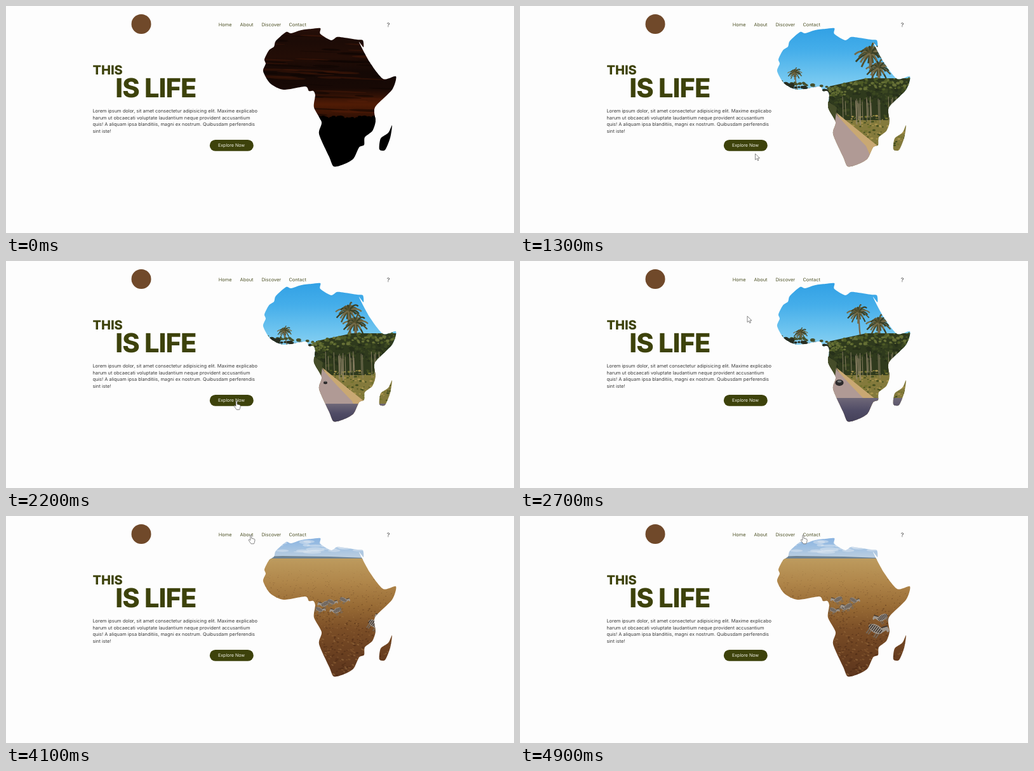
Write an HTML page with a canvas that moves like this. It is 800x358 px and loops after 5 s.

```html
<!DOCTYPE html>
<html lang="en">
<head>
<meta charset="utf-8">
<title>This is life</title>
<style>
html, body { margin: 0; height: 100%; overflow: hidden; background: #fdfdfd; }
canvas, svg { position: absolute; left: 0; top: 0; width: 800px; height: 358px; }
text { font: 7.4px Inter, "Open Sans", sans-serif; fill: #3a3a3a; text-rendering: geometricPrecision; }
.olive text { fill: #51552a; }
.olive .title { fill: #3d420b; font-size: 20px; font-weight: 800; letter-spacing: 0; }
.olive .big { font-size: 41.5px; letter-spacing: -.85px; }
</style>
</head>
<body>
<canvas id="stage" width="800" height="358"></canvas>
<svg viewBox="0 0 800 358">
  <circle cx="213" cy="28.5" r="15.5" fill="#70492a"/>
  <g class="olive">
    <text x="334.8" y="32.4">Home</text>
    <text x="368.6" y="32.4">About</text>
    <text x="402.4" y="32.4">Discover</text>
    <text x="445.4" y="32.4">Contact</text>
    <text class="title" x="136.4" y="107.6">THIS</text>
    <text class="title big" x="172.2" y="144.4">IS LIFE</text>
  </g>
  <text x="599.8" y="33" style="font-size:9px">?</text>
  <text x="136.4" y="168">Lorem ipsum dolor, sit amet consectetur adipisicing elit. Maxime explicabo</text>
  <text x="136.4" y="178.6">harum ut obcaecati voluptate laudantium neque provident accusantium</text>
  <text x="136.4" y="189.1">quis! A aliquam ipsa blanditiis, magni ex nostrum. Quibusdam perferendis</text>
  <text x="136.4" y="199.6">sint iste!</text>
  <rect x="320.8" y="211" width="69" height="17.8" rx="8.9" fill="#3d420b"/>
  <text x="334" y="222.4" style="font-size:7.05px;fill:#f4f4ea">Explore Now</text>
  <g id="cursor" fill="#fff" stroke="#555" stroke-width=".7" stroke-linejoin="round">
    <path id="arrow" d="M0 0V9.6L2.3 7.6 3.9 11 5.4 10.3 3.9 7H7Z"/>
    <path id="hand" d="M-1 1Q-1-.2 0-.2T1 1V5.2L5 6.2Q6.4 6.6 6.2 8L5.6 11.4 4.6 13.8H.2L-3.6 8.4Q-3.8 6.8-2.4 7.2L-1 8.4Z"/>
  </g>
</svg>
<script>
const LOOP = 5000, ROAD = 1000, PLAINS = 3000;
const $ = id => document.getElementById(id);
const ctx = $('stage').getContext('2d');
const mix = (a, b, p) => a + (b - a) * p;
const progress = (t, from, to) => Math.min(1, Math.max(0, (t - from) / (to - from)));

// Smooth closed outline through "x,y" points
function outline(text) {
  const pts = text.split(' ').map(s => s.split(',').map(Number));
  const at = i => pts[(i + pts.length) % pts.length];
  const path = new Path2D();
  path.moveTo(...pts[0]);
  pts.forEach((p, i) => {
    const [before, next, after] = [at(i - 1), at(i + 1), at(i + 2)];
    path.bezierCurveTo(
      ...p.map((v, k) => v + (next[k] - before[k]) / 8),
      ...next.map((v, k) => v - (after[k] - p[k]) / 8), ...next);
  });
  return path;
}
const land = outline('481,36 495,35 495,44 512,54 521,49 533,50 553,53 562,54 563,65 556,57 573,89 594,115 614,111 ' +
  '608,132 581,160 582,182 577,197 565,207 564,219 556,223 547,241 531,250 516,253 509,238 493,202 497,183 485,160 ' +
  '487,141 484,134 477,134 471,127 437,132 416,122 405,103 409,91 407,84 414,70 422,64 425,55 441,41 449,43 465,38');
land.addPath(outline('608,188 605,208 597,227 588,226 590,209 602,200'));

function scatter(n, seed, make) {
  const next = () => (seed = (seed * 16807) % 2147483647) / 2147483647;
  return Array.from({ length: n }, () => make((a, b) => mix(a, b, next())));
}

function fade(y0, y1, ...colors) {
  const g = ctx.createLinearGradient(0, y0, 0, y1);
  colors.forEach((c, i) => g.addColorStop(i / (colors.length - 1), c));
  ctx.fillStyle = g;
  ctx.fillRect(400, y0, 220, y1 - y0);
}
function oval(x, y, rx, ry, color, turn = 0) {
  ctx.fillStyle = color;
  ctx.beginPath();
  ctx.ellipse(x, y, rx, ry, turn, 0, 7);
  ctx.fill();
}
function shape(color, ...pts) {
  ctx.fillStyle = color;
  ctx.beginPath();
  pts.forEach(p => ctx.lineTo(...p));
  ctx.fill();
}
function line(color, width, ...pts) {
  ctx.strokeStyle = color;
  ctx.lineWidth = width;
  ctx.beginPath();
  pts.forEach(p => ctx.lineTo(...p));
  ctx.stroke();
}

const streaks = scatter(75, 11, r => ({ x: r(400, 620), y: r(38, 172), w: r(12, 45), h: r(.5, 2), glow: r(0, 1) < .5 }));
const treeline = scatter(50, 5, r => [r(485, 600), r(175, 180), r(2, 5)]);

function sunset(t) {
  fade(30, 180, '#2b1009', '#1c0b06', '#230d06', '#140805', '#180905', '#501b05', '#2b0f04');
  for (const s of streaks)
    oval(s.x + t * .002, s.y, s.w, s.h, s.glow ? '#5d220a50' : '#0c040380', .04);
  ctx.fillStyle = '#000';
  ctx.fillRect(400, 178, 220, 80);
  for (const [x, y, r] of treeline) oval(x, y, r, r * .7, '#000');
}

function palm(x, y, r, base) {
  line('#75674d', r * .09 + .5, [x, y], [x + r * .1, (y + base) / 2], [x + r * .3, base]);
  ctx.lineWidth = r * .11;
  for (let i = 0; i < 24; i++) {
    const a = i * 2.4, len = r * (.75 + .25 * Math.sin(i * 5));
    const dx = Math.cos(a) * len, dy = Math.sin(a) * len * .8;
    ctx.strokeStyle = ['#3a4026', '#746b48', '#55512f'][i % 3];
    ctx.beginPath();
    ctx.moveTo(x, y);
    ctx.quadraticCurveTo(x + dx * .6, y + dy * .8 - r * .2, x + dx, y + dy + r * .2);
    ctx.stroke();
  }
}

const canopy = x => 114 + Math.max(0, 545 - x) * .22;
const leaves = scatter(420, 23, r => {
  const x = r(484, 640), depth = r(0, 1);
  return [x, canopy(x) + depth * 44, r(1, 3.2), depth < .4 ? ['#4d5a26', '#667036'][r(0, 2) | 0] : ['#27301a', '#3b4721'][r(0, 2) | 0]];
});
const trunks = scatter(26, 31, r => [r(505, 600), r(142, 155), r(172, 190)]);
const grass = scatter(260, 41, r => [r(508, 618), r(172, 230), r(.8, 2.6), ['#465020', '#74742f', '#a8944e'][r(0, 3) | 0]]);
const bush = scatter(90, 53, r => [r(400, 490), r(0, 18), r(1.5, 4)]);

function road(t) {
  const p = progress(t, 1300, 2700), sway = Math.cos(p * 2 * Math.PI);
  fade(30, 150, '#2f9fe4', '#45aeea', '#6ec4ef', '#9bd9f3');
  palm(433 + 9 * p, 105 + 8 * p, 12, 132);
  for (const [x, y, r] of bush) oval(x, 114 + y + (x - 405) * .17, r, r * .7, y < 5 ? '#46502c' : '#272d20');
  palm(552 - 19 * p, 75 + 6 * p, 26 - 7 * p, 140);
  palm(556 + 9 * sway, 98, 21, 145);
  ctx.fillStyle = '#847a3c';
  ctx.fillRect(484, 165, 136, 90);
  shape('#2f3a1d', [484, 180], [488, canopy(488)], [545, canopy(545)], [620, 114], [620, 180]);
  for (const [x, y, r, c] of leaves) oval(x + 3 * sway, y, r, r * .75, c);
  for (const [x, y, r, c] of grass) oval(x + 3 * sway, y, r, r * .6, c);
  for (const [x, y0, y1] of trunks) line('#9a8c70', .8, [x + 3 * sway, y0], [x + 3 * sway + 1, y1]);
  shape('#c9a873', [498, 168], [540, 202], [570, 226], [575, 255], [545, 255]);
  shape('#b09a95', [495, 165], [501, 174], [520, 195], [545, 221], [560, 255], [470, 255], [492, 200]);
  shape('#454d29', [484, 150], [499, 160], [496, 183], [490, 190]);
  if (t < 1600) return;
  fade(mix(236, 216, progress(t, 1600, 2700)), 255, '#6f6878', '#504c66', '#433f58');
  if (t < 2200) return;
  const size = mix(3, 8, progress(t, 2200, 2900));
  oval(503, 192, size, size * .75, '#2c2a2b');
  oval(503, 190, size * .5, size * .25, '#77797a');
}

const clouds = scatter(28, 61, r => [r(405, 570), r(40, 59), r(5, 15), r(1, 3)]);
const tufts = scatter(1300, 71, r => {
  const y = r(85, 255);
  return [r(400, 620), y, .4 + (y - 85) * .014 * r(.5, 1), r(0, 1)];
});

function zebra(x, y, size, flip) {
  const dark = '#39312d', pale = '#a0978d';
  ctx.save();
  ctx.translate(x, y);
  ctx.scale(size / 22 * (flip ? -1 : 1), size / 22);
  ctx.rotate(.5);
  for (const leg of [-7, -4, 4, 7]) line('#75685a', 1.6, [leg, 2], [leg - 1, 11]);
  oval(0, 0, 10, 5.5, pale);
  shape(pale, [5, -4], [11, -10], [15, -8], [9, 2]);
  oval(14, -7, 4, 2, pale, .7);
  for (let k = -8; k < 9; k += 2.7) {
    const h = 4.5 - Math.abs(k) * .2;
    line(dark, 1.3, [k, -h], [k - 1, h]);
  }
  line(dark, 1.4, [6, -5], [12, -11]);
  ctx.restore();
}

function plains(t) {
  const p = progress(t, 3400, 4900), near = p * (2 - p);
  fade(30, 66, '#83afe0', '#9dbfe2', '#bdcfe0');
  for (const [x, y, w, h] of clouds) oval(x, y, w, h, '#e4ebf170');
  shape('#6d8293', [400, 64], [435, 63], [510, 64], [565, 66], [565, 70], [400, 70]);
  fade(67, 255, '#bd9b5e', '#b0864a', '#986b35', '#7a4d26', '#693f20', '#5c351d');
  for (const [x, y, w, c] of tufts)
    oval(x, y, w, w * .5, c < .55 ? '#43231270' : c < .8 ? '#9a6c3c60' : '#b48a5660', c - .5);
  for (let i = 0; i < 5; i++)
    zebra(493 + i * (11 - 3 * p), 140 + 9 * Math.sin(i * 2.4 + p * 2), 13 + i % 2 * 2, i % 2);
  zebra(mix(655, 571, near), mix(150, 160, near), mix(14, 19, near), true);
  zebra(mix(632, 560, near), mix(150, 178, near), mix(13, 26, near), false);
}

const trail = [[1000, 378, 245], [1600, 363, 221], [2200, 363, 221], [2700, 358, 87], [3400, 348, 30], [3600, 348, 30], [4900, 446, 30]];
const links = [...document.querySelectorAll('.olive text:not(.title)')].map(e => e.getBBox());
const show = (id, on) => $(id).style.display = on ? '' : 'none';

function pointer(t) {
  const i = Math.max(1, trail.findIndex(k => k[0] >= t)) ;
  const [t0, x0, y0] = t > 4900 ? trail.at(-1) : trail[i - 1];
  const [t1, x1, y1] = t > 4900 ? [LOOP, x0, y0] : trail[i];
  const p = progress(t, t0, t1), x = mix(x0, x1, p), y = mix(y0, y1, p);
  const over = x > 321 && x < 390 && y > 211 && y < 229 ||
    y > 24 && y < 37 && links.some(b => x >= b.x && x <= b.x + b.width);
  $('cursor').setAttribute('transform', `translate(${x} ${y})`);
  show('cursor', t >= ROAD);
  show('hand', over);
  show('arrow', !over);
}

const start = performance.now();
function tick() {
  const t = (performance.now() - start) % LOOP;
  ctx.clearRect(0, 0, 800, 358);
  ctx.save();
  ctx.clip(land);
  (t < ROAD ? sunset : t < PLAINS ? road : plains)(t);
  ctx.restore();
  pointer(t);
  requestAnimationFrame(tick);
}
tick();
</script>
</body>
</html>
```
